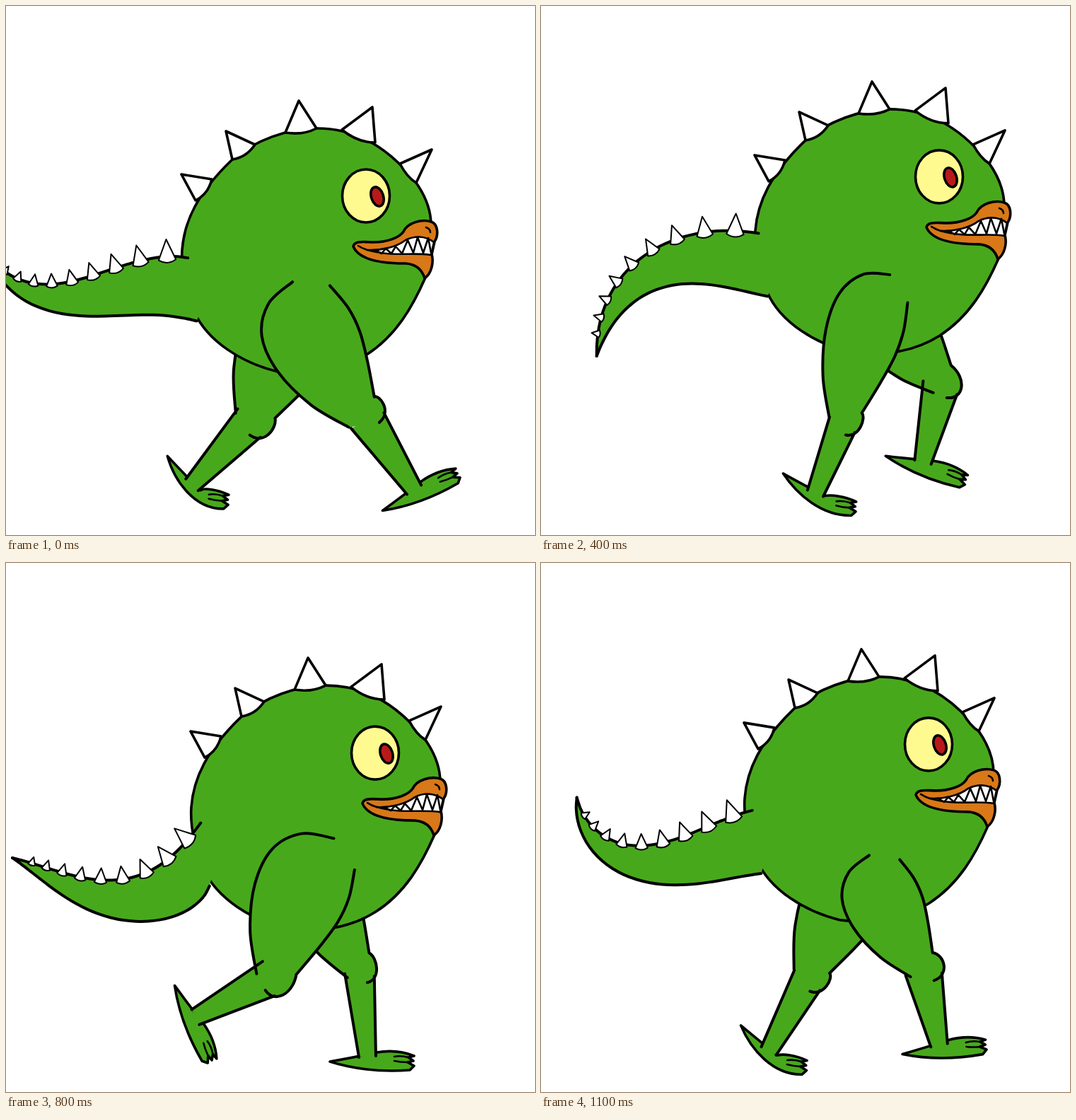
An HTML page that plays this animation: 748 by 748 pixels, repeating every 1200 ms.

```html
<!DOCTYPE html>
<html lang="en">
<head>
<meta charset="utf-8">
<title>Walking monster</title>
<style>
  html, body { margin: 0; width: 100%; height: 100%; overflow: hidden; background: #fff; }
  svg { display: block; width: 100%; height: 100%; }
  .skin { fill: #48a81c; }
  .line { fill: none; stroke: #000; stroke-width: 4; }
  .both { stroke: #000; stroke-width: 3.6; }
  .horn { fill: #fff; stroke: #000; stroke-width: 3.6; }
  .barb { fill: #fff; stroke: #000; stroke-width: 2; }
  .lip { fill: #d87818; }
  .thin { stroke-width: 2.6; }
</style>
</head>
<body>
<svg viewBox="0 0 748 748" stroke-linecap="round" stroke-linejoin="round">
  <g id="far"></g>
  <g id="body">
    <path class="skin both" d="M249 345C252 305 270 265 320 217C352 190 398 173 440 173C500 173 545 205 580 250C594 270 601 290 601 310L593 384C575 425 552 466 510 493C470 518 425 522 384 517C335 505 285 475 266 432C255 405 247 375 249 345Z"/>
    <path id="tailFill" class="skin"/>
    <path id="belly" class="line"/>
    <path id="ridge" class="line"/>
    <g id="barbs"></g>
    <g class="horn">
      <path d="M268 275L248 238L291 245Q286 266 268 275Z"/>
      <path d="M320 217L311 177L352 196Q340 214 320 217Z"/>
      <path d="M395 179L414 134L439 173Q420 183 395 179Z"/>
      <path d="M475 175L518 143L522 193Q497 193 475 175Z"/>
      <path d="M557 223L602 203L580 250Q567 242 557 223Z"/>
    </g>
    <ellipse class="both" fill="#fffa90" cx="509" cy="268.5" rx="33.5" ry="37.5"/>
    <ellipse class="both" fill="#b81a1a" cx="525" cy="269.5" rx="8.5" ry="14" transform="rotate(-18 525 269.5)"/>
    <path class="lip both" d="M491 340C493 331 507 334 520 334C538 334 556 328 562 319C568 306 588 301 601 305C611 308 612 324 606 333L602 351C605 362 602 378 592 385C588 372 580 365 565 364C540 364 500 362 491 340Z"/>
    <path class="horn thin" d="M511 345C530 346 552 341 565 331C577 325 592 324 605 334L601 352C575 348 545 355 511 345Z"/>
    <path class="line thin" d="M498 339Q504 343 511 345M522 345L531 350L537 343L545 350L551 340L560 350L568 331L576 349L582 327L590 349L597 328L601 349M594 313Q600 315 600 320"/>
  </g>
  <g id="near"></g>
</svg>
<script>
const STEP = 100, COUNT = 12;
const $ = id => document.getElementById(id);
const path = (cls, d) => `<path class="${cls}" d="${d}"/>`;
const rad = deg => deg * Math.PI / 180;
const wave = steps => Math.cos(2 * Math.PI * steps / COUNT);

// Body shift over one footfall; both halves of the walk share it.
const bob = [[0, 0], [2, 3], [13, 2], [50, -12], [54, -29], [39, -11]];

// Knee, ankle and sole angle by step; empty steps lie halfway.
const stride = [
  [505, 574, 577, 684, -26], ,
  [500, 569, 511, 698, 0],
  [490, 582, 495, 698, 0],
  [432, 580, 388, 689, 39],
  [384, 579, 322, 690, 50],
  [354, 581, 263, 677, 57], ,
  [384, 583, 268, 642, 64],
  [558, 541, 494, 628, 42],
  [569, 527, 540, 645, 17],
  [540, 568, 563, 682, -6]
];

function bodyAt(i) {
  const [x, y] = bob[i % 6];
  return [x, y + 2.2 * Math.sin(2 * Math.PI * i / COUNT)];
}

const legAt = i => stride[i] || stride[i - 1].map((v, k) => (v + stride[i + 1][k]) / 2);

// Smooth curve through the points.
function curve(p, cmd = 'M') {
  let d = cmd + p[0];
  for (let i = 0; i < p.length - 1; i++) {
    const a = p[i - 1] || p[i], b = p[i], c = p[i + 1], e = p[i + 2] || c;
    const c1 = b.map((v, k) => v + (c[k] - a[k]) / 6);
    const c2 = c.map((v, k) => v - (e[k] - b[k]) / 6);
    d += `C${c1} ${c2} ${c}`;
  }
  return d;
}

// Local axes: u along the angle, v to its right-hand side on screen.
function frame(x, y, angle, su = 1, sv = su) {
  const c = Math.cos(angle), s = Math.sin(angle);
  return (u, v) => [x + u * su * c - v * sv * s, y + u * su * s + v * sv * c];
}

function drawFoot(x, y, sole, bend) {
  const P = frame(...frame(x, y, rad(sole))(-53, 7), rad(sole));
  const T = frame(...P(72, 0), rad(sole + (3 - sole) * bend));
  const outline = `M${P(0, 0)}Q${P(45, -8)} ${P(66, -13)}C${T(12, -16)} ${T(30, -15)} ${T(47, -8)}` +
    `L${T(39, -6)}L${T(46, -1)}L${T(38, 1)}L${T(47, 6)}L${T(41, 12)}C${T(0, 15)} ${P(35, 11)} ${P(0, 0)}Z`;
  const toes = `M${T(39, -6)}Q${T(28, -9)} ${T(19, -7)}M${T(38, 1)}Q${T(28, 1)} ${T(19, -1)}`;
  return path('skin both', outline) + path('line thin', toes);
}

function drawLeg(i, body) {
  const [kx, ky, ax, ay, sole] = legAt(i);
  const stance = Math.max(0, Math.sin(2 * Math.PI * i / COUNT));
  const size = i > 8 ? .84 : 1.02;   // the swinging thigh is foreshortened
  const slim = 1 - .22 * stance;

  const aim = Math.atan2(ky - body[1] - 438, kx - body[0] - 424);
  const hip = frame(kx, ky, aim)(-160 * size, 0);
  const H = frame(...hip, aim, size, size * slim);
  const back = [H(-45, -8), H(-36, 36), H(-2, 67), H(52, 73), H(115, 57), H(168, 28)];
  const front = [H(-14, -50), H(25, -56), H(62, -53), H(103, -41), H(150, -24)];

  const tilt = Math.atan2(ay - ky, ax - kx);
  const S = frame(kx, ky, tilt, 1, slim), A = frame(ax, ay, tilt);
  const cap = `C${S(-8, -33)} ${S(22, -35)} ${S(25, -11)}`;
  const shin = [S(10, 27), A(0, 12), A(0, -12), S(17, -24)];

  // Toes stay flat on the ground while the heel lifts.
  const bend = Math.max(0, 1 - Math.max(0, Math.abs(i - 5) - 1) / 2);
  return drawFoot(ax, ay, sole, bend) +
    path('skin', `M${shin.join('L')}Z`) +
    path('skin', curve(front) + cap + `L${back[5]}` + curve([...back].reverse(), 'L') + 'Z') +
    path('line', curve(back) + curve(front) + cap + `M${shin[0]}L${shin[1]}M${shin[2]}L${shin[3]}`);
}

// The tail is a chain whose heading swings more, and later, towards the tip.
function drawTail(i) {
  const links = 20, length = 308, top = [], bottom = [];
  const lift = wave(i - 8.8);
  let x = 264 + 5 * lift, y = 402 + 11 * lift;
  for (let n = 0; n <= links; n++) {
    const s = n / links;
    const heading = -12 + 16 * s * s + (135 * s - 45) * wave(i - 8 - 2.6 * s);
    const lean = rad(-8 + (heading + 8) * Math.min(1, 1.6 * s));
    const half = 45 * (1 - s ** 1.3);
    const dx = half * Math.sin(lean), dy = half * Math.cos(lean);
    top.push([x + dx, y - dy]);
    bottom.push([x - dx, y + dy]);
    x -= length / links * Math.cos(rad(heading));
    y -= length / links * Math.sin(rad(heading));
  }
  const ridge = $('ridge');
  ridge.setAttribute('d', curve(top));
  $('belly').setAttribute('d', curve(bottom));
  $('tailFill').setAttribute('d', curve(top) + curve([...bottom].reverse(), 'L') + `Q292 395 ${top[0]}Z`);
  drawBarbs(ridge);
}

function drawBarbs(ridge) {
  const total = ridge.getTotalLength();
  let out = '';
  for (let n = 0; n < 9; n++) {
    const at = total * (.1 + .135 * n - .0043 * n * n);
    const a = ridge.getPointAtLength(at - 4), b = ridge.getPointAtLength(at + 4);
    const turn = Math.atan2(a.y - b.y, a.x - b.x) * 180 / Math.PI;
    const h = 33 - 2.6 * n, w = h * .34 + 1;
    out += `<path class="barb" transform="translate(${(a.x + b.x) / 2} ${(a.y + b.y) / 2}) rotate(${turn})" ` +
      `d="M${-w} ${h * .14}L0 ${-h * .74}L${w} ${h * .14}Q0 ${h * .38} ${-w} ${h * .14}Z"/>`;
  }
  $('barbs').innerHTML = out;
}

let shown = -1;
function tick() {
  const i = Math.floor(performance.now() / STEP) % COUNT;
  if (i !== shown) {
    shown = i;
    const body = bodyAt(i);
    $('far').innerHTML = drawLeg((i + COUNT / 2) % COUNT, body);
    $('near').innerHTML = drawLeg(i, body);
    $('body').setAttribute('transform', `translate(${body})`);
    drawTail(i);
  }
  requestAnimationFrame(tick);
}
tick();
</script>
</body>
</html>
```
